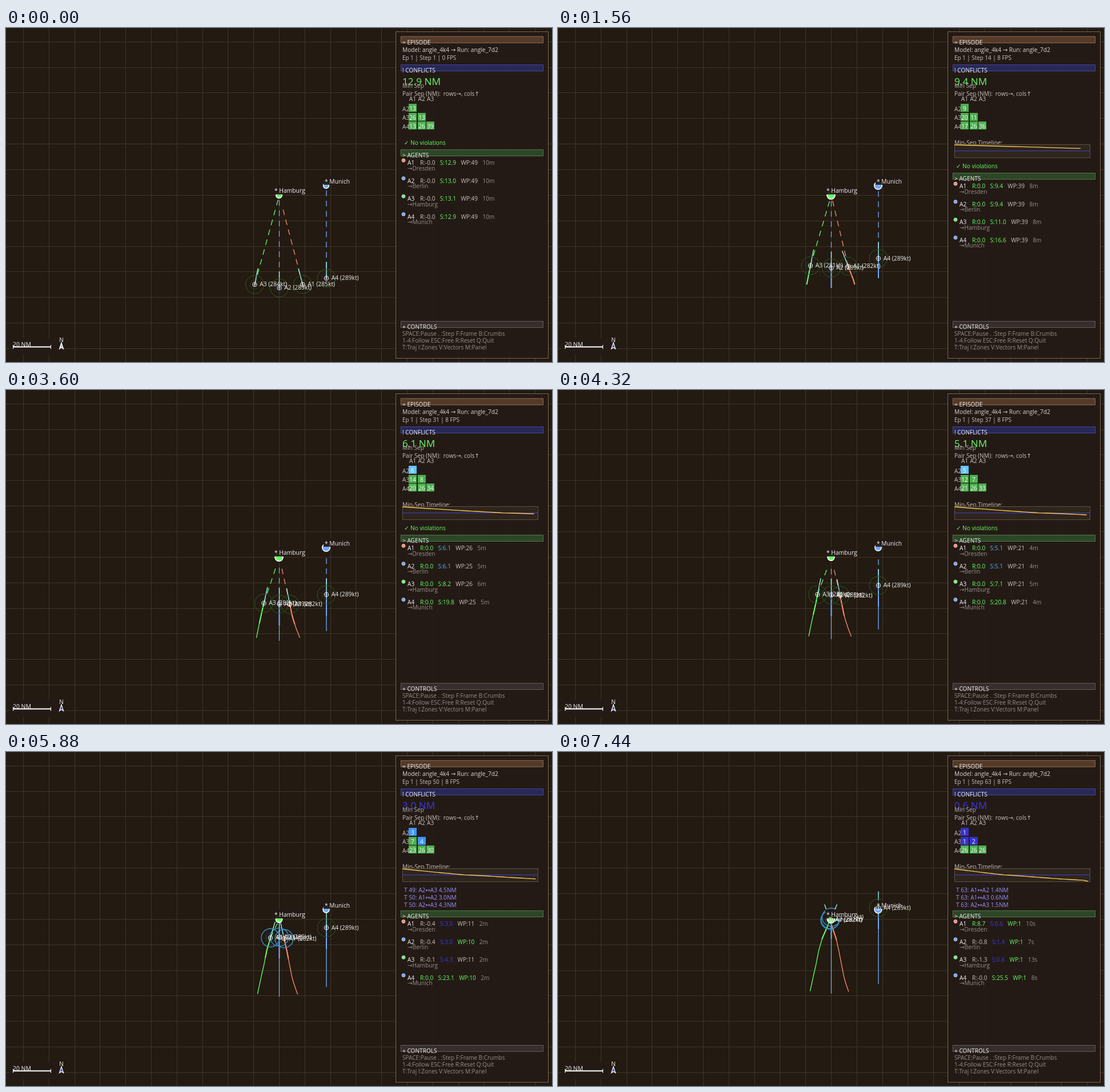
An HTML page with a canvas that plays this animation: 956 by 586 pixels, repeating every 7560 ms.

```html
<!DOCTYPE html>
<html lang="en">
<head>
<meta charset="utf-8">
<title>Separation monitor</title>
<style>
html, body { margin: 0; width: 100%; height: 100%; overflow: hidden; background: #231a11; }
canvas { display: block; }
</style>
</head>
<body>
<canvas id="stage" width="956" height="586"></canvas>
<script>
const ctx = document.getElementById('stage').getContext('2d');
const STEP = 120, STEPS = 63, TAU = Math.PI * 2;
const ORANGE = '#ff8c6e', BLUE = '#6eaaff', GREEN = '#64ff64', GREY = '#c8c3be', DIM = '#968f88';
const ALERT = '#3c37e6', CAUTION = '#50b4f0', PANEL = 'rgba(36,27,22,.95)';

const HAMBURG = { x: 478.5, y: 293.5, name: 'Hamburg', box: [468, 276, 55, 16] };
const MUNICH = { x: 561, y: 276.5, name: 'Munich', box: [556, 260, 46, 15] };

// path: [step, x, y]; rate: distance flown per step; least: smallest distance left
const agents = [
  { id: 'A1', color: ORANGE, to: 'Dresden', goal: HAMBURG, kt: 282, kt0: 285, rate: .778, least: .7,
    path: [[1, 519.5, 450], [4, 517.3, 442], [14, 508, 418], [20, 503, 403], [24, 500.5, 393.5], [31, 497, 376], [41, 492, 350], [50, 487, 327.5], [63, 476, 295]] },
  { id: 'A2', color: BLUE, to: 'Berlin', goal: HAMBURG, kt: 289, kt0: 289, rate: .79, least: .58,
    path: [[1, 478.5, 456], [63, 478.5, 290]] },
  { id: 'A3', color: GREEN, to: 'Hamburg', goal: HAMBURG, kt: 281, kt0: 284, rate: .774, least: .7,
    path: [[1, 435.5, 450], [14, 442, 417], [24, 447.5, 391.5], [31, 451.5, 374], [41, 456.5, 348.5], [50, 463, 326], [63, 477, 294]] },
  { id: 'A4', color: BLUE, to: 'Munich', goal: MUNICH, kt: 289, kt0: 289, rate: .79, least: .62,
    path: [[1, 561, 439], [63, 561, 273.5]] }
];

// separations in NM at the key steps
const keys = [1, 14, 24, 31, 41, 50, 63];
const pairs = [
  [0, 1, [13, 9.4, 7, 6.1, 4.4, 3, 1.4]],
  [0, 2, [26, 20, 16, 14, 11, 7.2, .6]],
  [1, 2, [13.1, 11, 9.3, 8.2, 6.4, 4.3, 1.5]],
  [0, 3, [12.9, 16.6, 18.9, 19.8, 21.5, 23.1, 25.5]],
  [1, 3, [26, 26, 26, 26, 26, 26, 26]],
  [2, 3, [39, 36, 35, 34, 32, 30, 26]]
];

function lerpKeys(xs, ys, x) {
  let i = 1;
  while (i < xs.length - 1 && x > xs[i]) i++;
  return ys[i - 1] + (ys[i] - ys[i - 1]) * (x - xs[i - 1]) / (xs[i] - xs[i - 1]);
}
function place(a, n) {
  const col = k => a.path.map(p => p[k]);
  return [lerpKeys(col(0), col(1), n), lerpKeys(col(0), col(2), n)];
}
const sep = (p, n) => lerpKeys(keys, p[2], n);
const minSep = n => Math.min(...pairs.map(p => sep(p, n)));
const agentSep = (i, n) => Math.min(...pairs.filter(p => p[0] === i || p[1] === i).map(p => sep(p, n)));

function violations(n) {
  const log = [];
  for (let s = 1; s <= n; s++)
    for (const p of pairs) {
      const d = sep(p, s);
      if (d < 4.85) log.push(`T ${s}: ${agents[p[0]].id}↔${agents[p[1]].id} ${d.toFixed(1)}NM`);
    }
  return log.slice(-3);
}

function text(str, x, y, color = GREY, size = 10.15, align = 'left') {
  ctx.font = `${size}px "Open Sans", "DejaVu Sans", sans-serif`;
  ctx.textAlign = align;
  ctx.fillStyle = color;
  ctx.fillText(str, x, y);
  return ctx.measureText(str).width;
}
function line(points, color, width = 1) {
  ctx.beginPath();
  points.forEach(p => ctx.lineTo(p[0], p[1]));
  ctx.strokeStyle = color;
  ctx.lineWidth = width;
  ctx.stroke();
}
function circle(x, y, r, stroke, width = 1, fill) {
  ctx.beginPath();
  ctx.arc(x, y, r, 0, TAU);
  if (fill) { ctx.fillStyle = fill; ctx.fill(); }
  if (stroke) { ctx.strokeStyle = stroke; ctx.lineWidth = width; ctx.stroke(); }
}
function box(x, y, w, h, fill, stroke) {
  ctx.fillStyle = fill;
  ctx.fillRect(x, y, w, h);
  if (!stroke) return;
  ctx.strokeStyle = stroke;
  ctx.lineWidth = 1;
  ctx.strokeRect(x + .5, y + .5, w - 1, h - 1);
}

function drawGrid() {
  box(0, 0, 956, 586, '#231a11');
  for (let k = 0; k < 22; k++) {
    const x = Math.round(30 + 44.8 * k) + .5, y = Math.round(23.7 + 44.85 * k) + .5;
    line([[x, 0], [x, 586]], '#3f3529');
    line([[0, y], [956, y]], '#3f3529');
  }
}

function drawRoute(a, n) {
  const [x, y] = place(a, n);
  const dx = a.goal.x - x, dy = a.goal.y - y, d = Math.hypot(dx, dy);
  const at = s => [x + dx * s / d, y + dy * s / d];
  for (let k = 0; k < Math.floor(d / 18); k++) line([at(k * 18), at(k * 18 + 10)], a.color, 1.3);
}

function drawTrail(a, n) {
  const first = 1 + (n < 20 ? 0 : Math.floor(n / 5));
  const points = [];
  for (let s = first; s <= n; s++) points.push(place(a, s));
  if (points.length < 2) return;
  line(points, a.color, 1.3);
  line(points.slice(-15), a.color, 2);
}

function drawVector(a, i, n) {
  const [x, y] = place(a, n), [px, py] = place(a, n - 1);
  const d = Math.hypot(x - px, y - py) / 29;
  if (i !== 1 || n < 62) line([[x, y], [x + (x - px) / d, y + (y - py) / d]], '#96f0f5', 1.4);
  const close = agentSep(i, n) < 5;
  circle(x, y, 16, close ? '#3296d2' : '#285a1e', close ? 1.3 : 1);
  circle(x, y, 8, close ? '#32506e' : '#343a34', .8);
}

// pulses once a second
function drawGoal(a, n) {
  const g = a.goal, r = 5.8 + Math.cos(TAU * (n - 14.2) * STEP / 1000);
  circle(g.x - .5, g.y, r, '#fff', 1.5, a.color);
  box(...g.box, PANEL);
  text('* ' + g.name, g.box[0] + 2, g.box[1] + 12.5, '#f0f0f0', 10.3);
}

function drawMarker(a, n) {
  const [x, y] = place(a, n);
  circle(x, y, 3.8, '#dcebe6', 1);
  line([[x - 3, y], [x + 3, y]], a.color);
  line([[x, y - 3], [x, y + 3]], '#fff');
  text(`${a.id} (${n === 1 ? a.kt0 : a.kt}kt)`, x + 8.7, y + 3.3, '#f0f0f0', 10.3);
}

function drawScale(n) {
  box(6, 544, 90, 30, PANEL);
  text('20 NM', 12, 559, '#f0f0f0', 10.4);
  line([[12, 559.5], [79, 559.5]], '#fff', 2);
  line([[12.5, 556], [12.5, 563]], '#fff');
  line([[78.5, 556], [78.5, 563]], '#fff');
  ctx.beginPath();
  [[97, 552], [100.5, 563], [97, 560.5], [93.5, 563]].forEach(p => ctx.lineTo(...p));
  ctx.closePath();
  ctx.fillStyle = n === 1 ? '#a0c8ff' : '#3c37c8';
  ctx.fill();
  ctx.strokeStyle = '#fff';
  ctx.lineWidth = 1.2;
  ctx.stroke();
  text('N', 97, 551, '#f0f0f0', 10, 'center');
}

function header(label, y, fill, stroke) {
  box(691, y, 250, 12, fill, stroke);
  text(label, 694, y + 14, '#f0f0f0');
}

function drawMatrix(n) {
  for (let i = 0; i < 3; i++) {
    text(agents[i].id, 706 + i * 15.5, 128);
    text(agents[i + 1].id, 694, 145.5 + i * 15.6);
  }
  for (const p of pairs) {
    const d = sep(p, n), x = Math.round(705 + p[0] * 15.5), y = Math.round(133 + (p[1] - 1) * 15.6);
    box(x, y, 14, 14, d < 2.5 ? '#3732cd' : d < 5 ? '#3c96fa' : d < 6.9 ? '#64c3fa' : '#4caf50');
    text(d.toFixed(0), x + 7, y + 11.5, '#fff', 10.15, 'center');
  }
}

function drawTimeline(n) {
  text('Min-Sep Timeline:', 694, 205);
  box(694, 204, 238, 24, '#2d251e', '#5f5041');
  line([[694, 215.7], [932, 215.7]], '#4641c8');
  const points = [];
  for (let i = 0; i < n; i++) points.push([694 + 238 * i / n, 228 - minSep(i + 1) * 1.77]);
  line(points, '#fac850', 1.4);
}

function reward(i, n) {
  if (n === 1) return '-0.0';
  if (n === STEPS) return ['8.7', '-0.8', '-1.3', '-0.0'][i];
  const loss = Math.max(0, 5 - agentSep(i, n)) * .2;
  return loss < .05 ? '0.0' : (-loss).toFixed(1);
}

function drawAgentRow(a, i, n, y) {
  const s = agentSep(i, n), r = reward(i, n);
  const left = Math.max(a.least, 49 - a.rate * (n - 1)), wp = Math.round(left);
  const minutes = left / (n === 1 ? a.kt0 : a.kt) * 60;
  const eta = minutes < 1 ? Math.round(minutes * 60) + 's' : Math.round(minutes) + 'm';
  circle(696, y - 7.7, 3, '#e1e1e1', .8, a.color);
  text(a.id, 703, y, '#f0f0f0');
  let x = 725;
  const put = (str, color) => { x += text(str, x, y, color) + 8.3; };
  put('R:' + r, r[0] === '-' ? GREY : GREEN);
  put('S:' + s.toFixed(1), s < 5 ? ALERT : s < 6.9 ? CAUTION : GREEN);
  put('WP:' + wp, wp <= 10 ? GREEN : GREY);
  put(eta, DIM);
  text('→' + a.to, 703, y + 9.6, DIM);
}

function drawPanel(n) {
  box(682, 6, 268, 574, PANEL, '#786450');
  header('= EPISODE', 14.5, '#543a28', '#8c6950');
  text('Model: angle_4k4 → Run: angle_7d2', 694, 42, '#dcd7d2');
  text(`Ep 1 | Step ${n} | ${n === 1 ? 0 : 8} FPS`, 694, 56, GREY, 9.9);

  header('! CONFLICTS', 64, '#28285a', '#46468c');
  const low = minSep(n);
  text(low.toFixed(1) + ' NM', 694, 99.5, low < 5 ? ALERT : GREEN, 17.2);
  text('Min Sep', 694, 104.7, '#b4aea8');
  text('Pair Sep (NM):  rows→, cols↑', 694, 118.5);
  drawMatrix(n);

  let y = 205;
  if (n > 1) { drawTimeline(n); y += 41; }
  const log = violations(n);
  if (log.length) log.forEach((entry, k) => text(entry, 697, y + k * 12.8, '#9691ff'));
  else text('✓ No violations', 697, y, GREEN);

  const top = y + 8 + 12 * Math.max(0, log.length - 1);
  header('> AGENTS', top, '#2d4628', '#507846');
  agents.forEach((a, i) => drawAgentRow(a, i, n, top + 27 + i * 31.5));

  header('+ CONTROLS', 514, '#372d2d', '#645a55');
  ['SPACE:Pause . :Step F:Frame B:Crumbs', '1-4:Follow ESC:Free R:Reset Q:Quit', 'T:Traj I:Zones V:Vectors M:Panel']
    .forEach((str, k) => text(str, 694, 540 + k * 12, DIM, 10));
}

function draw(n) {
  drawGrid();
  agents.forEach(a => drawRoute(a, n));
  agents.forEach(a => drawTrail(a, n));
  agents.forEach((a, i) => drawVector(a, i, n));
  agents.forEach(a => { drawGoal(a, n); drawMarker(a, n); });
  drawScale(n);
  drawPanel(n);
}

const start = performance.now();
let shown = 0;
function tick() {
  const n = 1 + Math.floor((performance.now() - start) / STEP) % STEPS;
  if (n !== shown) draw(shown = n);
  requestAnimationFrame(tick);
}
tick();
</script>
</body>
</html>
```
